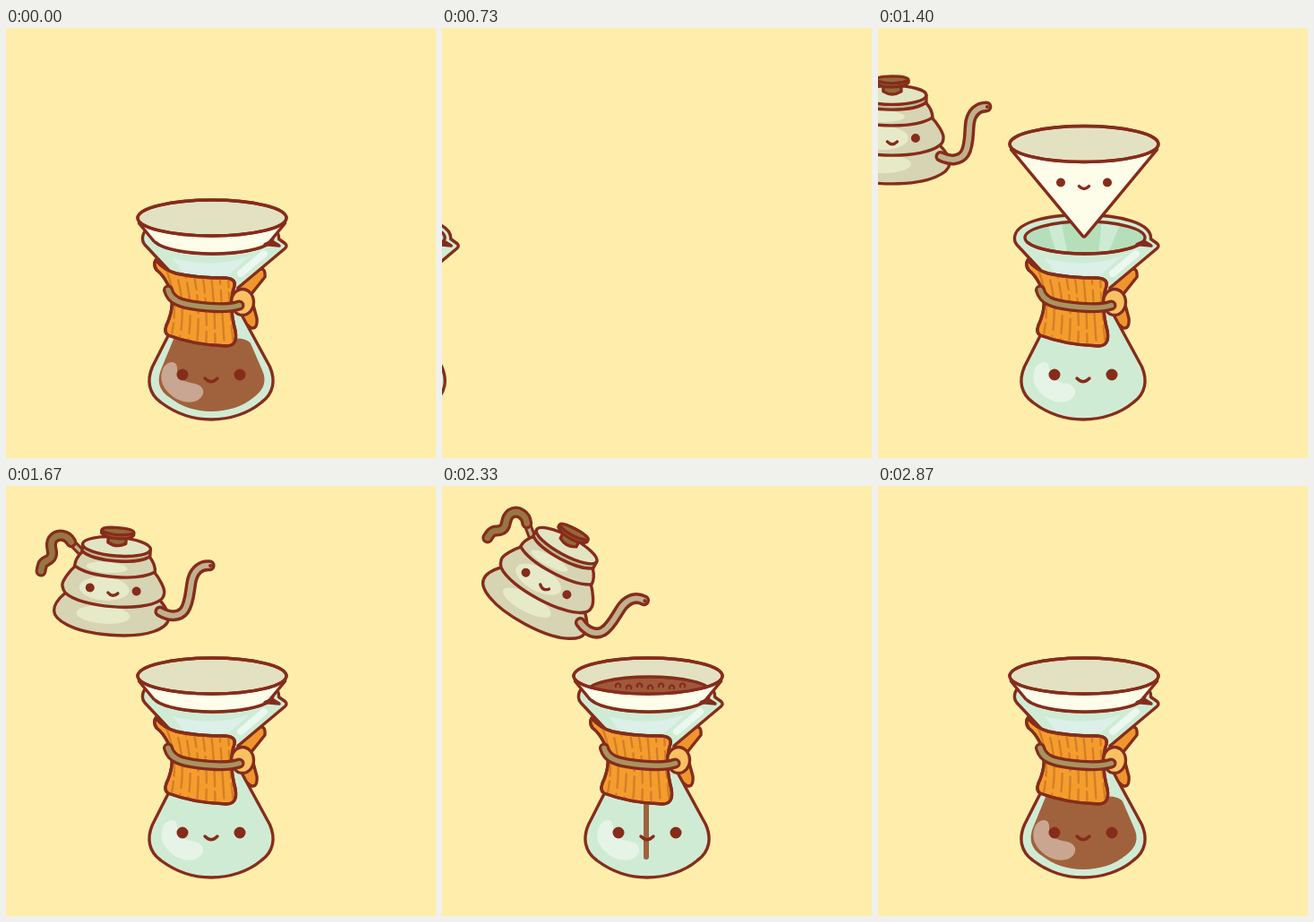
Write an HTML page that moves like this. It is 480x480 px and loops after 3.14 s.

```html
<!DOCTYPE html>
<html lang="en">
<head>
<meta charset="utf-8">
<title>Pour-over</title>
<style>
html, body { margin: 0; width: 100%; height: 100%; overflow: hidden; background: #ffeeab; }
svg { display: block; width: 100vw; height: 100vh; }
.o { stroke: #862c1b; stroke-width: 3.4; stroke-linecap: round; stroke-linejoin: round; }
.line { fill: none; }
.tube path { fill: none; stroke-linecap: round; stroke-linejoin: round; }
.dark { fill: #862c1b; }
</style>
</head>
<body>
<svg viewBox="0 0 480 480">
  <defs>
    <clipPath id="aboveLip"><path d="M-400-400H900V239.300H295A67 18 0 0 1 167 239.300H-400Z"/></clipPath>
    <clipPath id="filterMouth"><ellipse cx="230" cy="212" rx="83" ry="20"/></clipPath>
    <clipPath id="opening"><ellipse cx="231" cy="234" rx="67" ry="18"/></clipPath>
    <clipPath id="collarShape"><use href="#collar"/></clipPath>
    <clipPath id="level"><rect id="levelRect" x="150" width="160" height="120"/></clipPath>
  </defs>

  <g id="carafe">
    <path class="o" fill="#ee962d" d="M282 269Q290 267 289 278L273 298L280 324Q281 336 274 335L252 318V296Z"/>
    <path class="o" fill="#d0ebd4" d="M152.500 236C151 218 185 208.500 229 208.500C270 208.500 306 218 304.500 235.500L311.500 240.500Q314.500 243 311.500 246L259 290Q256 304 264 322L294.500 378C301 393 299 408 285 418C271 430 250 437 229 437C209 437 189 430 173 418C159 408 157 393 163.500 378L196 314Q198 290 184 273L155 242Q152.500 239 152.500 236Z"/>
    <path fill="#daf0e8" d="M186 257Q231 269 272 255L248 276H200Z"/>
    <path fill="none" stroke="#ebf8f0" stroke-width="8" stroke-linecap="round" d="M288 252L262 274"/>
    <g clip-path="url(#opening)">
      <path fill="#b5dfbb" d="M160 212H300V254H160Z"/>
      <path fill="#cdebd2" d="M188 214H204L212 254H200ZM250 214H272L256 254H246Z"/>
    </g>
    <ellipse class="o line" cx="231" cy="234" rx="67" ry="18"/>

    <g clip-path="url(#aboveLip)">
      <g id="filter">
        <path class="o" fill="#fefde9" d="M148.500 218L228 314Q230 317 232 314L311.500 218Z"/>
        <ellipse class="o" fill="#e2e2c2" cx="230" cy="212" rx="83" ry="20"/>
        <g clip-path="url(#filterMouth)">
          <g id="brew">
            <ellipse id="brewTop" class="o" fill="#a0583a" cx="231"/>
            <g id="bubbles" class="line" stroke="#862c1b" stroke-width="2.400" stroke-linecap="round"></g>
          </g>
        </g>
        <ellipse class="o line" cx="230" cy="212" rx="83" ry="20"/>
        <g data-face="230 255 26 5"></g>
      </g>
    </g>
    <path class="o line" d="M167 239.300A67 18 0 0 0 295 239.300"/>
    <path class="o dark" stroke-width="2" d="M289 241.500L305 243L297 238Z"/>

    <path id="drip" fill="none" stroke="#a0623d" stroke-width="6" stroke-linecap="round"/>
    <path id="liquid" fill="#a0623d" clip-path="url(#level)" d="M190 340L174 379C167 395 172 405 182 412C196 423 212 428 229 428C246 428 264 423 277 412C289 403 291 393 286 382L273 352Q269 346 250 346Z"/>
    <path fill="#fff" opacity=".43" d="M181 374C189 371 192 376 191 384C191 392 199 395 211 397C223 400 223 411 213 416C199 422 179 411 174 395C172 386 175 377 181 374Z"/>
    <g data-face="229 387 32 6.500"></g>

    <path id="collar" class="o" fill="#f59c2e" d="M167 259Q176 270 190 274Q212 279 245 279Q257 280 255 288Q248 308 256 338Q259 355 246 355Q210 354 181 343Q176 340 179 332Q190 308 182 289Q176 276 168 270Q164 264 167 259Z"/>
    <g id="grain" class="line" stroke="#d07f27" stroke-width="2.300" stroke-linecap="round" clip-path="url(#collarShape)"></g>
    <use href="#collar" style="fill-opacity:0"/>
    <ellipse class="o" fill="#fac163" cx="264" cy="306" rx="12.500" ry="14.500"/>
    <g class="tube" data-tube="M181 292.500C184 304 194 308 215 310.500C235 313 250 313 260.500 309.500" data-look="12 5.500 #a8945f"></g>
  </g>

  <path id="stream" fill="none" stroke="#c9eadd" stroke-width="3.400"/>

  <g id="kettle">
    <g class="tube" data-tube="M-20 86L-35 73" data-look="9.500 3.500 #bfb08a"></g>
    <g class="tube" data-tube="M-34 74C-39 66 -50 65 -55 73C-59 82 -51 86 -55 93C-58 98 -63 97 -64 102Q-65 106 -65 109" data-look="13 6.500 #987644"></g>
    <path class="o" fill="#d6d4b2" d="M-36 131C-42 137 -48 145 -47 152C-46 161 -28 174 17 174C62 174 80 161 81 152C82 145 76 137 70 131Z"/>
    <ellipse fill="#e6eac8" cx="8" cy="152" rx="30" ry="10"/>
    <path class="o" fill="#d6d4b2" d="M-27 100C-33 106 -41 118 -40 123Q-39 128 -36 131C-18 146 52 146 70 131Q74 128 74 123C75 118 67 106 61 100Z"/>
    <ellipse fill="#e6eac8" cx="7" cy="123" rx="28" ry="13"/>
    <path class="o" fill="#d6d4b2" d="M-21 84Q-28 92 -28 100C-10 112 44 112 62 100Q62 92 55 84Z"/>
    <ellipse fill="#e6eac8" cx="8" cy="99" rx="23" ry="6"/>
    <path class="o" fill="#c3bd97" d="M-21 75V83C-8 94 42 94 55 83V75Z"/>
    <ellipse class="o" fill="#e2e5c3" cx="17" cy="75" rx="38" ry="10.500"/>
    <path class="o" fill="#93693a" d="M7 63V71Q17 77 27 71V63Z"/>
    <path class="o" fill="#93693a" d="M-1 58Q-1 54 17 54Q35 54 35 58V61Q31 66 17 66Q3 66 -1 61Z"/>
    <path class="o line" stroke-width="2" d="M-1 59Q17 65 35 59"/>
    <g class="tube" data-tube="M71 143.500C82 149 93 148 98 140C104 130 102 113 104 104C106 95 112 88 122 88" data-look="13 6 #c0b18c"></g>
    <circle class="dark" cx="123" cy="88" r="2"/>
    <g data-face="17 123 26 5"></g>
  </g>
</svg>
<script>
const $ = id => document.getElementById(id);
const LOOP = 3140, STEP = 1000 / 15;

function addPath(parent, d, attrs = {}) {
  const p = document.createElementNS("http://www.w3.org/2000/svg", "path");
  p.setAttribute("d", d);
  for (const k in attrs) p.setAttribute(k, attrs[k]);
  parent.append(p);
  return p;
}

const dot = (x, y, r) => `M${x - r} ${y}a${r} ${r} 0 1 0 ${2 * r} 0a${r} ${r} 0 1 0 ${-2 * r} 0`;

for (const g of document.querySelectorAll("[data-face]")) {
  const [x, y, gap, r] = g.dataset.face.split(" ").map(Number);
  addPath(g, dot(x - gap, y, r) + dot(x + gap, y, r), { class: "dark" });
  addPath(g, `M${x - r - .5} ${y + 4}Q${x} ${y + 4 + r * 1.15} ${x + r + .5} ${y + 4}`, { class: "o line" });
}

for (const g of document.querySelectorAll("[data-tube]")) {
  const [outer, inner, color] = g.dataset.look.split(" ");
  addPath(g, g.dataset.tube, { stroke: "#862c1b", "stroke-width": outer });
  addPath(g, g.dataset.tube, { stroke: color, "stroke-width": inner });
}

for (let i = 0; i < 8; i++) {
  addPath($("grain"), `M${178 + i * 10} 268Q${196 + i * 7.5} 310 ${181 + i * 10.5} 358`,
    { "stroke-dasharray": "30 7 20 6", "stroke-dashoffset": i * 23 % 63 });
}

for (let i = 0; i < 7; i++) {
  addPath($("bubbles"), `M${194 + i * 12} ${i % 2 ? 2 : 0}a2.700 2.700 0 1 1 5 0`);
}

const smooth = u => u * u * (3 - 2 * u);
const linear = u => u;

// keys: [time in steps, value] pairs
function track(keys, t, ease = smooth) {
  if (t <= keys[0][0]) return keys[0][1];
  for (let i = 1; i < keys.length; i++) {
    const [t0, a] = keys[i - 1], [t1, b] = keys[i];
    if (t < t1) return a + (b - a) * ease((t - t0) / (t1 - t0));
  }
  return keys[keys.length - 1][1];
}

const slideOut = [[2, 0], [7, 342]];
const slideIn = [[10, -329], [15, 0]];
const filterY = [[18, -318], [22.5, 0]];
const kettleX = [[17.5, -103], [24, 133.6], [37, 133.6], [42, -106]];
const kettleY = [[17.5, 119], [24, 104.5], [37, 104.5], [42, 119]];
const tilt = [[24, 0], [29, 43.5], [33, 43.5], [38, 0]];
const brewTop = [[27, 231], [29, 222], [34, 212.5], [35, 213], [42, 228.5]];
const fill = [[35, 429], [42, 377], [43, 340]];

const show = (id, on) => $(id).setAttribute("visibility", on ? "visible" : "hidden");
const set = (id, attrs) => { for (const k in attrs) $(id).setAttribute(k, attrs[k]); };

function draw(t) {
  const leaving = t < 10;
  set("carafe", { transform: `translate(${track(leaving ? slideOut : slideIn, t)} 0)` });
  set("filter", { transform: `translate(0 ${leaving ? 0 : track(filterY, t)})` });
  show("filter", leaving || t > 18);

  // the brew surface is a slice of the cone
  const depth = (track(brewTop, t, linear) - 192) / (1 + 20 / 104);
  const scale = 1 - depth / 104;
  set("brewTop", { cy: 212 + depth, rx: 83 * scale, ry: 20 * scale });
  set("bubbles", { transform: `translate(0 ${206.5 + depth})` });
  show("brew", t >= 28 && t < 43);

  const level = leaving ? 340 : track(fill, t, linear);
  set("levelRect", { y: level });
  show("liquid", leaving || t > 35);
  set("drip", { d: `M228 345V${Math.min(391 + (t - 34) * 23, 414, Math.max(level, 372))}` });
  show("drip", t >= 33 && t < 43);

  const x = track(kettleX, t), y = track(kettleY, t), angle = track(tilt, t);
  set("kettle", { transform: `translate(${x} ${y}) rotate(${angle}) translate(-30 -111)` });
  show("kettle", t > 18 && t < 42);

  const a = angle * Math.PI / 180, dx = 93, dy = -23;
  const tipX = x + dx * Math.cos(a) - dy * Math.sin(a) - 1;
  const tipY = y + dx * Math.sin(a) + dy * Math.cos(a);
  set("stream", { d: `M${tipX} ${tipY}V231` });
  show("stream", t >= 28 && t < 34);
}

const start = performance.now();
function tick() {
  const ms = (performance.now() - start) % LOOP;
  draw(Math.floor((ms + 5) / STEP));
  requestAnimationFrame(tick);
}
draw(0);
requestAnimationFrame(tick);
</script>
</body>
</html>
```
